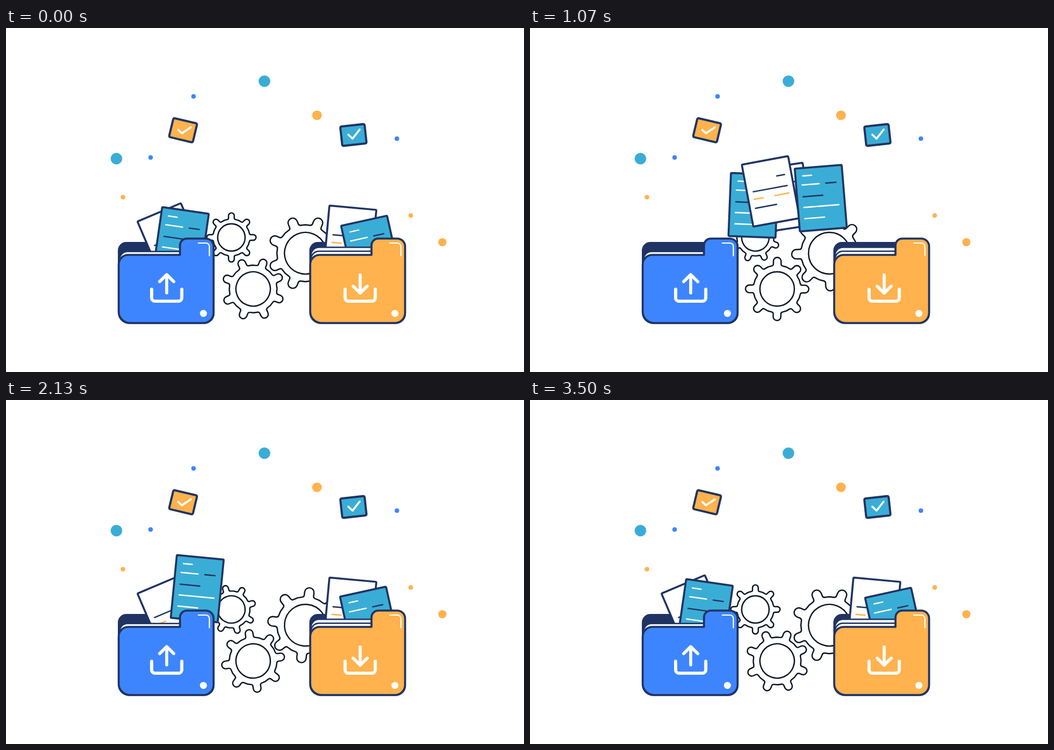
Recreate the animation shown at these times as an HTML page with a canvas. Size 917 by 611 pixels, loop 3530 ms.

```html
<!DOCTYPE html>
<html lang="en">
<head>
<meta charset="utf-8">
<title>Folder exchange</title>
<style>
  html, body { margin: 0; width: 100%; height: 100%; overflow: hidden; background: #fff; }
  canvas { display: block; }
</style>
</head>
<body>
<canvas id="stage" width="917" height="611"></canvas>
<script>
const ctx = document.getElementById('stage').getContext('2d');
const LOOP = 3530;
const NAVY = '#1f3463', INK = '#0c1624', TEAL = '#3aadd6', BLUE = '#3d85ff', ORANGE = '#ffb24d', WHITE = '#fff';

const rad = deg => deg * Math.PI / 180;
const clamp01 = v => Math.min(1, Math.max(0, v));
const bezier = (a, b, c, d, s) =>
  a * (1 - s) ** 3 + 3 * b * s * (1 - s) ** 2 + 3 * c * s * s * (1 - s) + d * s ** 3;

// Same curve as CSS cubic-bezier(x1, 0, x2, 1)
function ease(u, x1, x2) {
  if (u <= 0 || u >= 1) return clamp01(u);
  let lo = 0, hi = 1;
  for (let i = 0; i < 24; i++) {
    const mid = (lo + hi) / 2;
    if (bezier(0, x1, x2, 1, mid) < u) lo = mid; else hi = mid;
  }
  return bezier(0, 0, 1, 1, lo);
}

const whiteSheet = {
  fill: WHITE,
  left: { x: 293, y: 379, deg: -23 },
  right: { x: 609, y: 375, deg: 5.2 },
  text: [[NAVY, 'M15.5 -25h14 M-30.5 -5h61 M-32 24.6h38'], [ORANGE, 'M-31 8.6h16 M6 8.6h25']]
};
const tealSheet = {
  fill: TEAL,
  left: { x: 309.8, y: 379.5, deg: 8.2 },
  right: { x: 646, y: 397, deg: -12.5 },
  text: [[WHITE, 'M-28.5 -42h15.5 M-31 -26h30 M-31 14h62 M-31 34h35'], [NAVY, 'M11 -26h18 M-31 -5h35']]
};

// Flights between the folders, back to front; c1 and c2 bend the path
const FLIGHTS = [
  { sheet: whiteSheet, from: 'left', to: 'right', c1: [363, 276], c2: [529, 275], begin: 100, end: 1750, curve: [0.8, 0.43] },
  { sheet: tealSheet, from: 'left', to: 'right', c1: [387, 257], c2: [560, 315], begin: 100, end: 2300, curve: [0.64, 0.47] },
  { sheet: whiteSheet, from: 'right', to: 'left', c1: [539, 259], c2: [353, 260], begin: 30, end: 1930, curve: [0.15, 0.85] },
  { sheet: tealSheet, from: 'right', to: 'left', c1: [559, 276], c2: [367, 245], begin: 90, end: 2560, curve: [0.15, 0.85] }
];

const GEARS = [
  { x: 530, y: 400, outer: 68, hole: 37, rest: 22.5, dir: 1 },
  { x: 399, y: 372, outer: 44.8, hole: 24.3, rest: 0, dir: 1 },
  { x: 437.5, y: 463.5, outer: 57.2, hole: 30.5, rest: 21, dir: -1 }
];
const TEETH = 8;

function disc(x, y, r, fill) {
  ctx.beginPath();
  ctx.arc(x, y, r, 0, Math.PI * 2);
  ctx.fillStyle = fill;
  ctx.fill();
}

function stroke(color, width, path) {
  ctx.strokeStyle = color;
  ctx.lineWidth = width;
  if (path) ctx.stroke(path); else ctx.stroke();
}

function polyline(points, color, width) {
  ctx.beginPath();
  points.forEach(p => ctx.lineTo(...p));
  stroke(color, width);
}

function box(x, y, w, h, r, fill, width) {
  ctx.beginPath();
  ctx.roundRect(x, y, w, h, r);
  ctx.fillStyle = fill;
  ctx.fill();
  if (width) stroke(NAVY, width);
}

function placed(x, y, deg, draw) {
  ctx.save();
  ctx.translate(x, y);
  ctx.rotate(rad(deg));
  draw();
  ctx.restore();
}

function gear({ x, y, outer, hole, rest, dir }, turn) {
  const line = 2.4, tip = outer - line / 2;
  const half = outer * 0.14 - line / 2, root = outer * 0.76 - line / 2;
  const step = Math.PI * 2 / TEETH, fillet = outer * 0.06;
  const shoulder = Math.sqrt(root * root - half * half);
  placed(x, y, rest + dir * turn, () => {
    ctx.beginPath();
    for (let i = 0; i < TEETH; i++) {
      ctx.lineTo(-root * Math.sin(step / 2), -root * Math.cos(step / 2));
      ctx.arcTo(-half, -shoulder, -half, half - tip, fillet);
      ctx.arc(0, half - tip, half, Math.PI, 0);
      ctx.arcTo(half, -shoulder, root * Math.sin(step / 2), -root * Math.cos(step / 2), fillet);
      ctx.rotate(step);
    }
    ctx.closePath();
    ctx.fillStyle = WHITE;
    ctx.fill();
    stroke(INK, line);
    ctx.beginPath();
    ctx.arc(0, 0, hole, 0, Math.PI * 2);
    stroke(INK, line);
  });
}

function paper({ sheet, from, to, c1, c2, begin, end, curve }, t) {
  const a = sheet[from], b = sheet[to];
  const p = ease((t - begin) / (end - begin), ...curve);
  const x = bezier(a.x, c1[0], c2[0], b.x, p);
  const y = bezier(a.y, c1[1], c2[1], b.y, p);
  placed(x, y, a.deg + (b.deg - a.deg) * p, () => {
    box(-41.7, -56, 83.4, 112, 1.5, sheet.fill, 3.5);
    sheet.text.forEach(([color, d]) => stroke(color, 2.4, new Path2D(d)));
  });
}

function card(x, y, deg, fill, tick) {
  placed(x, y, deg, () => box(-21.6, -17.3, 43.2, 34.6, 2.5, fill, 3.8));
  polyline(tick, WHITE, 3.6);
}

function dots(color, r, ...centres) {
  centres.forEach(([x, y]) => disc(x, y, r, color));
}

function folderBack(x) {
  box(x - 1.5, 380, 171, 145.5, [15, 15, 18, 20], NAVY);
}

function folderFront(x, fill, sheets) {
  sheets.forEach(y => box(x + 1.5, y, 160, 100, 14, WHITE, 2.6));
  placed(x, 0, 0, () => {
    ctx.beginPath();
    ctx.moveTo(0, 420);
    ctx.arcTo(0, 403, 17, 403, 17);
    ctx.lineTo(108.5, 403);
    ctx.arcTo(108.5, 374, 121, 374, 12);
    ctx.arcTo(168, 374, 168, 388, 14);
    ctx.arcTo(168, 524, 150, 524, 18);
    ctx.arcTo(0, 524, 0, 504, 20);
    ctx.closePath();
    ctx.fillStyle = fill;
    ctx.fill();
    stroke(NAVY, 3.6);

    ctx.beginPath();
    ctx.moveTo(141, 382);
    ctx.arcTo(160.5, 382, 160.5, 388, 6);
    ctx.lineTo(160.5, 404.5);
    stroke(WHITE, 2.2);
    disc(150, 507, 6.2, WHITE);
  });
}

function transferIcon(x, up) {
  const reach = 26.7, top = 464, floor = 485.3;
  ctx.beginPath();
  ctx.moveTo(x - reach, top);
  ctx.arcTo(x - reach, floor, x, floor, 6);
  ctx.arcTo(x + reach, floor, x + reach, top, 6);
  ctx.lineTo(x + reach, top);
  stroke(WHITE, 5.6);
  const tip = up ? 438 : 471, wing = tip + (up ? 12.5 : -12.5);
  polyline([[x, 438.5], [x, 470.5]], WHITE, 5.4);
  polyline([[x - 12.5, wing], [x, tip], [x + 12.5, wing]], WHITE, 5.4);
}

function draw(t) {
  ctx.fillStyle = WHITE;
  ctx.fillRect(0, 0, 917, 611);
  ctx.lineCap = ctx.lineJoin = 'round';

  dots(TEAL, 10.3, [457.5, 94.5], [195.5, 232]);
  dots(BLUE, 4, [332, 121.5], [692, 196.5], [256, 230]);
  dots(ORANGE, 4, [207, 300.5], [716.5, 333]);
  dots(ORANGE, 8.6, [550.5, 155]);
  dots(ORANGE, 7.3, [772.5, 380.5]);
  card(313.5, 181.6, 13.4, ORANGE, [[305, 181], [311.5, 187], [327, 176.5]]);
  card(615, 190, -6.2, TEAL, [[606, 189.5], [613.5, 196.5], [626, 180.5]]);

  const turn = 3 * 360 / TEETH * ease(t / 3100, 0.68, 0.32);
  GEARS.forEach(g => gear(g, turn));

  folderBack(199.5);
  folderBack(538.5);
  FLIGHTS.forEach(f => paper(f, t));
  folderFront(199.5, BLUE, [397]);
  folderFront(538.5, ORANGE, [389.5, 396.5]);
  transferIcon(284.5, true);
  transferIcon(627, false);
}

const start = performance.now();
function tick() {
  draw((performance.now() - start) % LOOP);
  requestAnimationFrame(tick);
}
tick();
</script>
</body>
</html>
```
